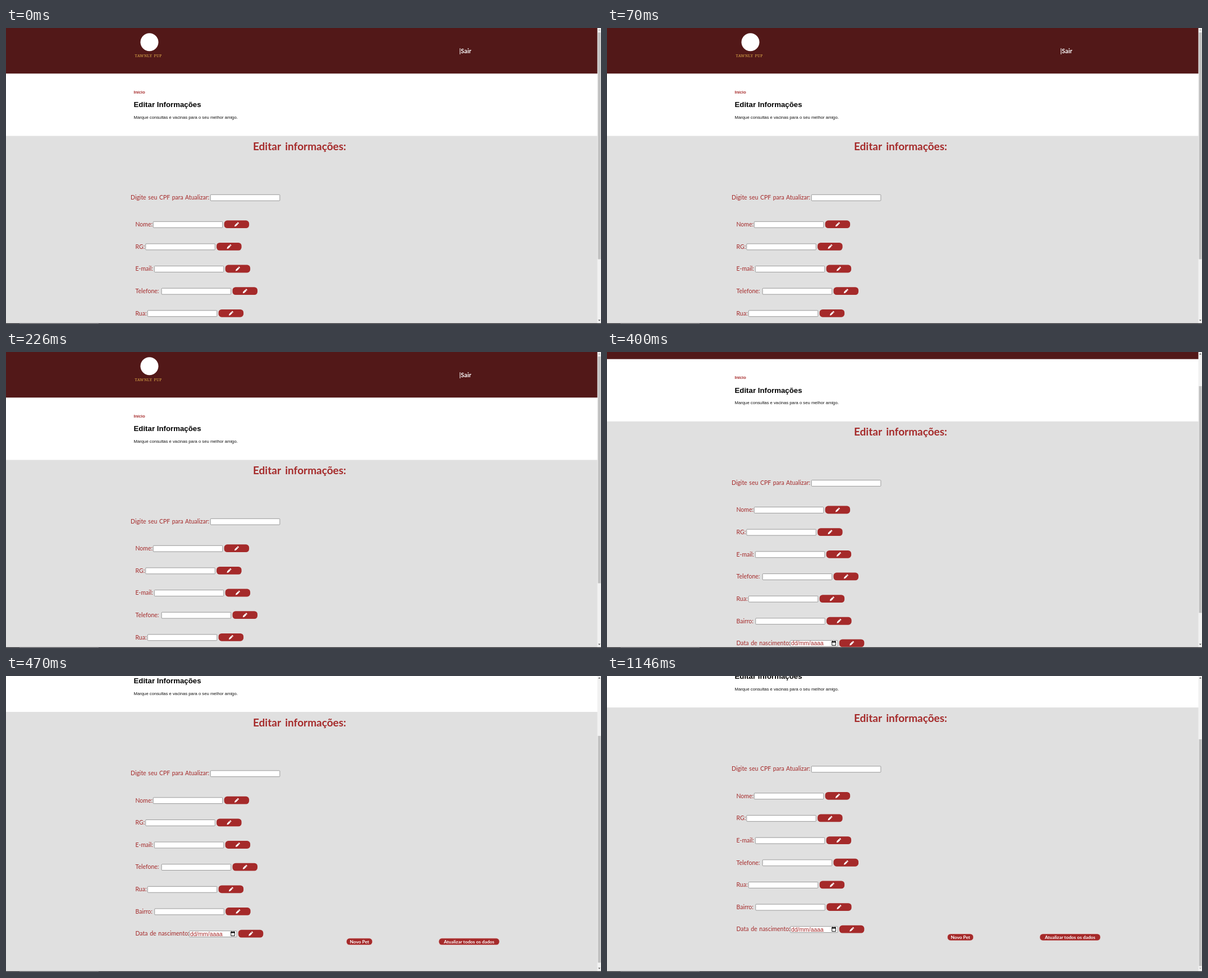
An HTML page that plays this animation: 1060 px wide and 528 px high, repeating every 1550 ms.

```html
<!DOCTYPE html>
<html lang="pt-BR">
<head>
<meta charset="utf-8">
<title>Editar Informações</title>
<style>
  @property --scroll { syntax: "<number>"; inherits: true; initial-value: 0; }
  html, body { margin: 0; width: 100%; height: 100%; overflow: hidden; background: #e0e0e0; }
  svg { display: block; width: 1060px; height: 528px; animation: scroll 1550ms step-end infinite; }
  @keyframes scroll {
    0% { --scroll: 0; }
    21.29% { --scroll: 13.8; }
    25.806% { --scroll: 68.7; }
    30.323% { --scroll: 128.5; }
    34.839%, 100% { --scroll: 136.4; }
  }
  #page { transform: translateY(calc(var(--scroll) * -1px)); }
  #thumb { transform: translateY(calc(var(--scroll) * .769px)); }
  #up { opacity: calc(.4 + var(--scroll)); }
  #down { opacity: calc(136.8 - var(--scroll)); }
  text { font: 10.5px Lato, sans-serif; fill: #a52a2a; word-spacing: 1px; }
  .sans { font: 7.73px "Liberation Sans", Arial, sans-serif; fill: #111; word-spacing: 0; }
  .bold { font-weight: bold; }
  .title { font: bold 19px Lato, sans-serif; word-spacing: 3px; }
  .brand { font: 6.8px "Noto Serif", serif; fill: #e3b04b; letter-spacing: .4px; }
  .white { font-weight: bold; fill: #fff; }
  .button-text { font-size: 8.3px; word-spacing: 0; }
  .button { fill: #a52a2a; }
  .field { fill: #fff; stroke: #767676; stroke-width: .7; }
</style>
</head>
<body>
<svg viewBox="0 0 1060 528">
  <defs>
    <g id="pencil" transform="rotate(45)" fill="#fff">
      <path d="M-1.5-2.7h3v5.3L0 5.2-1.5 2.6z"/>
      <rect x="-1.5" y="-5" width="3" height="1.8" rx=".6"/>
    </g>
  </defs>
  <rect width="1060" height="528" fill="#e0e0e0"/>
  <g id="page">
    <rect width="1054" height="81.5" fill="#521818"/>
    <rect y="81.5" width="1054" height="111" fill="#fff"/>
    <circle cx="255.5" cy="25.3" r="16" fill="#fff"/>
    <text class="brand" x="229.5" y="52">TAWNLY PUP</text>
    <text class="white" x="807.5" y="44.5" style="font-size:11px">|Sair</text>
    <text class="sans bold" x="227.5" y="117" style="fill:#a52a2a">Início</text>
    <text class="sans bold" x="227.5" y="141.3" style="font-size:13.25px;fill:#000">Editar Informações</text>
    <text class="sans" x="227.5" y="162">Marque consultas e vacinas para o seu melhor amigo.</text>
    <text class="title" x="440" y="218">Editar informações:</text>
    <text x="222" y="305.7">Digite seu CPF para Atualizar:</text>
    <rect class="field" x="364.3" y="297.3" width="123.5" height="10.8" rx="1"/>
    <g id="rows"></g>
    <text class="sans" x="328" y="592" style="font-size:10.4px;fill:#a52a2a">dd/mm/aaaa</text>
    <path d="M400.8 585.2h6.6v6.8h-6.6z" fill="none" stroke="#111"/>
    <path d="M400.3 584.7h7.6v2.3h-7.6zM401.5 583.7h1.2v1h-1.2zM405.5 583.7h1.2v1h-1.2z" fill="#111"/>
    <g stroke="#f2dede" stroke-width=".6">
      <rect class="button" x="606.5" y="596.3" width="46.2" height="12" rx="5.5"/>
      <rect class="button" x="771" y="596.3" width="108" height="12" rx="5.5"/>
    </g>
    <text class="white button-text" x="629.8" y="605.5" text-anchor="middle">Novo Pet</text>
    <text class="white button-text" x="825" y="605.5" text-anchor="middle">Atualizar todos os dados</text>
  </g>
  <rect x="1053.5" width="6.5" height="528" fill="#f1f1f1"/>
  <rect id="thumb" x="1054.5" y="8" width="5" height="404.5" fill="#c1c1c1"/>
  <path id="up" d="M1055 4.5l2-2.3 2 2.3z" fill="#505050"/>
  <path id="down" d="M1055 520.5l2 2.3 2-2.3z" fill="#505050"/>
  <rect y="526.7" width="1060" height="1.3" fill="#26262b"/>
  <rect x="24" y="526.9" width="141" height="1.1" fill="#55555a"/>
</svg>
<script>
  const fields = [
    ["Nome:", 262.3], ["RG:", 248.8], ["E-mail:", 264.3], ["Telefone:", 277.2],
    ["Rua:", 252.3], ["Bairro:", 264.8], ["Data de nascimento:", 326.5, 84.5]
  ];
  document.getElementById("rows").innerHTML = fields.map(([label, x, width = 123.5], i) => {
    const y = 350.3 + i * 39.65, buttonX = x + width + 2.8;
    return `<text x="230.5" y="${y + 3.7}">${label}</text>
      <rect class="field" x="${x}" y="${y - 5}" width="${width}" height="10.8" rx="1"/>
      <rect class="button" x="${buttonX}" y="${y - 7}" width="44.5" height="13.8" rx="5.5"/>
      <use href="#pencil" x="0" y="0" transform="translate(${buttonX + 22} ${y + .3})"/>`;
  }).join("");
</script>
</body>
</html>
```
